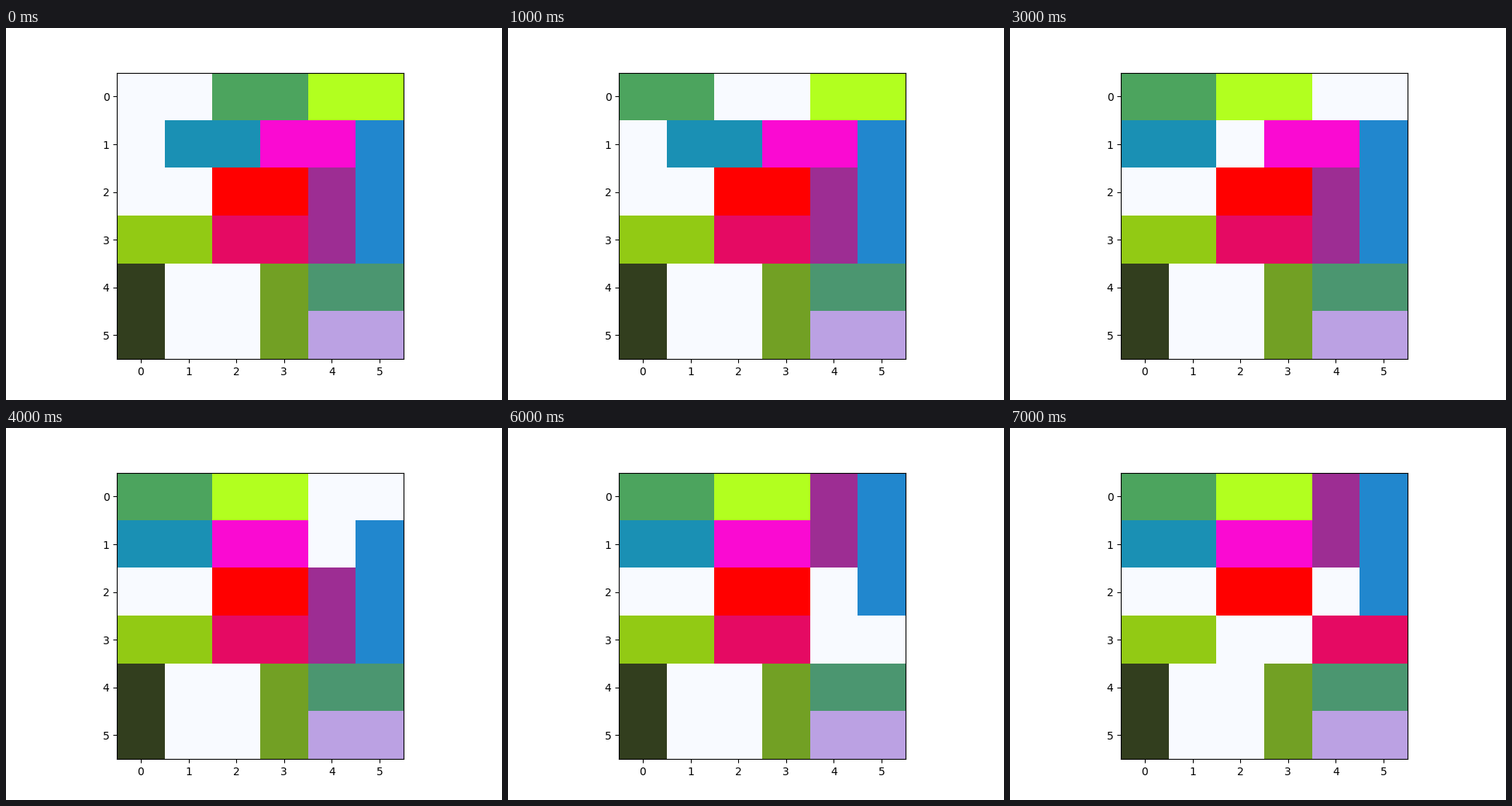
Recreate the animation shown at these times as a matplotlib script. Size 640 by 480 pixels, loop 8000 ms.

```python
import numpy as np
import matplotlib.pyplot as plt
from matplotlib.animation import FuncAnimation

SIZE = 6
EMPTY = "#f8faff"

# name: (row, column, height, width, colour)
BLOCKS = {
    "green": (0, 2, 1, 2, "#4ca45e"),
    "lime": (0, 4, 1, 2, "#b2ff1f"),
    "teal": (1, 1, 1, 2, "#1a90b4"),
    "magenta": (1, 3, 1, 2, "#fa0ad2"),
    "blue": (1, 5, 3, 1, "#2187ce"),
    "red": (2, 2, 1, 2, "#ff0000"),
    "purple": (2, 4, 2, 1, "#9d2d93"),
    "grass": (3, 0, 1, 2, "#92ca14"),
    "crimson": (3, 2, 1, 2, "#e50a63"),
    "dark": (4, 0, 2, 1, "#323e1e"),
    "olive": (4, 3, 2, 1, "#72a024"),
    "sea": (4, 4, 1, 2, "#4b9670"),
    "lavender": (5, 4, 1, 2, "#bba1e3"),
}

# one move per second: (block, row step, column step)
MOVES = [
    ("green", 0, -2),
    ("lime", 0, -2),
    ("teal", 0, -1),
    ("magenta", 0, -1),
    ("purple", -2, 0),
    ("blue", -1, 0),
    ("crimson", 0, 2),
]


def rgb(code):
    return [int(code[i:i + 2], 16) for i in (1, 3, 5)]


def board(step):
    """Grid of colours after the first `step` moves."""
    shift = {name: (dr, dc) for name, dr, dc in MOVES[:step]}
    grid = np.full((SIZE, SIZE, 3), rgb(EMPTY), dtype=np.uint8)
    for name, (row, col, height, width, colour) in BLOCKS.items():
        dr, dc = shift.get(name, (0, 0))
        row, col = row + dr, col + dc
        grid[row:row + height, col:col + width] = rgb(colour)
    return grid


fig, ax = plt.subplots(figsize=(6.4, 4.8), dpi=100)
image = ax.imshow(board(0))
ax.set_xticks(range(SIZE))
ax.set_yticks(range(SIZE))


def update(step):
    image.set_data(board(step))
    return [image]


anim = FuncAnimation(fig, update, frames=len(MOVES) + 1, interval=1000,
                     repeat=True, repeat_delay=0)
plt.show()
```
